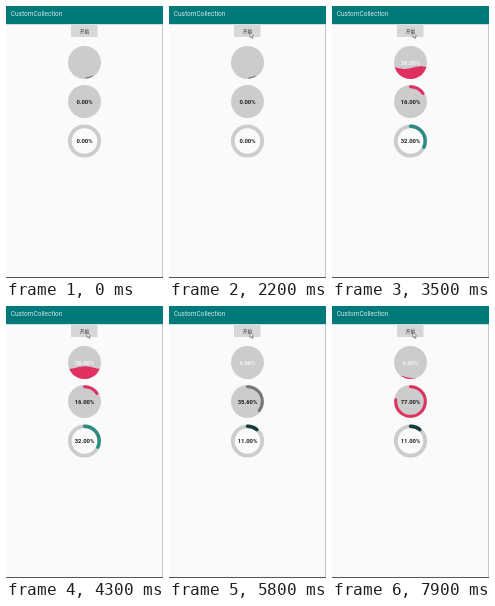
These frames come from a looping animation (157 by 272 pixels, 8000 ms). An HTML page with a canvas:

```html
<!DOCTYPE html>
<html lang="en">
<head>
<meta charset="utf-8">
<title>CustomCollection</title>
<style>
html, body { margin: 0; width: 100%; height: 100%; overflow: hidden; background: #fafafa; }
canvas { display: block; width: 157px; height: 272px; }
</style>
</head>
<body>
<canvas></canvas>
<script>
const canvas = document.querySelector('canvas');
const ctx = canvas.getContext('2d');
const scale = window.devicePixelRatio || 1;
canvas.width = 157 * scale;
canvas.height = 272 * scale;

const LOOP = 8000, STEP = 100;
const CX = 78.5, RADIUS = 16.5;
const GREY = '#cccbcd', PINK = '#e0305f', TEAL = '#2a8c82';
const RATE = 0.0482; // percent per millisecond
const RUNS = [
  { start: 2400, wave: 38, disc: 16, ring: 32 },
  { start: 5060, wave: 6, disc: 77, ring: 11 },
];

function valueAt(t, name) {
  const run = RUNS.filter(r => t >= r.start).pop();
  if (!run) return 0;
  return Math.min(run[name], Math.floor((t - run.start) * RATE * 5) / 5);
}

function rect(x, y, w, h, color) {
  ctx.fillStyle = color;
  ctx.fillRect(x, y, w, h);
}

function disc(y, color) {
  ctx.fillStyle = color;
  ctx.beginPath();
  ctx.arc(CX, y, RADIUS, 0, 2 * Math.PI);
  ctx.fill();
}

function arc(y, radius, from, to, width, color) {
  ctx.strokeStyle = color;
  ctx.lineWidth = width;
  ctx.beginPath();
  ctx.arc(CX, y, radius, from, to);
  ctx.stroke();
}

function progress(y, radius, percent, width, color) {
  if (percent <= 0) return;
  ctx.lineCap = 'round';
  arc(y, radius, -Math.PI / 2, (percent / 50 - 0.5) * Math.PI, width, color);
  ctx.lineCap = 'butt';
}

function label(text, x, y, font, color, align = 'center') {
  ctx.font = font;
  ctx.fillStyle = color;
  ctx.textAlign = align;
  ctx.textBaseline = 'middle';
  ctx.fillText(text, x, y);
}

function percentLabel(value, y, color) {
  label(value.toFixed(2) + '%', CX, y, 'bold 5.9px Roboto, sans-serif', color);
}

function waveView(t, muted) {
  const cy = 56.5, value = valueAt(t, 'wave');
  disc(cy, GREY);
  if (!value) {
    arc(cy, 15.6, Math.PI * 0.33, Math.PI * 0.48, 1, '#666');
    return;
  }
  const level = cy + RADIUS - value * 0.3;
  const crest = 67 + (7900 - t) * 0.0125;
  ctx.save();
  ctx.beginPath();
  ctx.arc(CX, cy, RADIUS, 0, 2 * Math.PI);
  ctx.clip();
  ctx.beginPath();
  ctx.moveTo(61, 75);
  for (let x = 61; x <= 96; x++) {
    ctx.lineTo(x, level - 1.3 * Math.cos((x - crest) / 33 * 2 * Math.PI));
  }
  ctx.lineTo(96, 75);
  ctx.fillStyle = muted ? '#c4c4c4' : PINK;
  ctx.fill();
  ctx.restore();
  percentLabel(value, 56.8, '#f6f4f5');
}

function pointer(t) {
  if (t < 400) return;
  const p = Math.min(1, (t - 400) / 1100);
  const away = (1 - p) ** 2;
  ctx.save();
  ctx.translate(81 + 78 * away, 26.5 + 45 * away);
  ctx.beginPath();
  [[0, 0], [0, 5], [1.2, 4], [2.1, 6], [3, 5.6], [2.2, 3.7], [3.6, 3.6]]
    .forEach(([x, y]) => ctx.lineTo(x, y));
  ctx.closePath();
  ctx.fillStyle = '#fff';
  ctx.fill();
  ctx.strokeStyle = '#555';
  ctx.lineWidth = 0.6;
  ctx.stroke();
  ctx.restore();
}

function draw(t) {
  const muted = t < 2700 || (t >= 5060 && t < 6200);
  const pressed = RUNS.some(r => t >= r.start - 100 && t < r.start + 200);
  ctx.setTransform(scale, 0, 0, scale, 0, 0);

  rect(0, 0, 157, 272, '#fafafa');
  rect(0, 18, 157, 1, '#d5dddd');
  rect(0, 0, 157, 18, '#00797a');
  rect(156, 18, 1, 254, '#c4c4c4');
  rect(0, 271, 157, 1, '#555');
  label('CustomCollection', 4.8, 8.4, '6.5px Roboto, sans-serif', '#cfe6e4', 'left');

  rect(65, 19, 26.5, 12, pressed ? '#b0b7b9' : '#d6d7d7');
  label('开始', CX, 25.2, '4.7px "Noto Sans CJK SC", "Noto Sans CJK", sans-serif', '#333');

  waveView(t, muted);

  const discValue = valueAt(t, 'disc');
  disc(95.5, GREY);
  progress(95.5, 14.8, discValue, 3, muted ? '#777' : PINK);
  percentLabel(discValue, 96, '#1c1c1c');

  const ringValue = valueAt(t, 'ring');
  arc(135, 14.7, 0, 2 * Math.PI, 3.8, GREY);
  progress(135, 14.7, ringValue, 3.4, muted || t >= 7600 ? '#123d3c' : TEAL);
  percentLabel(ringValue, 135.3, '#1c1c1c');

  pointer(t);
}

function tick() {
  const t = performance.now() % LOOP;
  draw(Math.floor(t / STEP) * STEP);
  requestAnimationFrame(tick);
}
tick();
</script>
</body>
</html>
```
